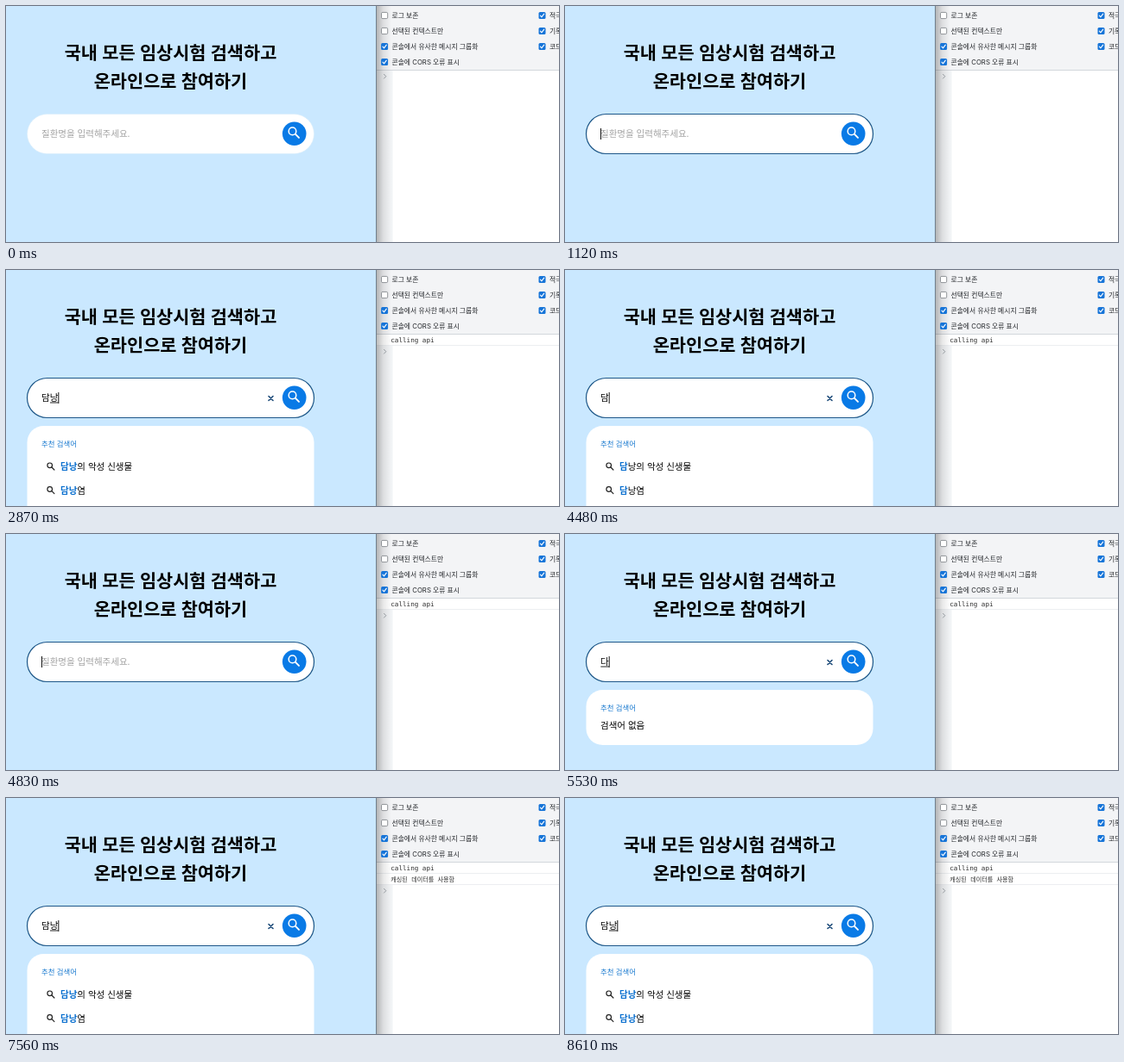
Animation, 640 px wide and 274 px high, one loop 8680 ms. Source, as an HTML page:

```html
<!DOCTYPE html>
<html lang="ko">
<head>
<meta charset="utf-8">
<title>검색어 추천</title>
<style>
  html, body { margin: 0; width: 100%; height: 100%; overflow: hidden; background: #cae8ff; }
  svg { display: block; width: 640px; height: 274px; }
  text { font-family: "Noto Sans CJK KR", "Noto Sans CJK", sans-serif; font-size: 10.5px; fill: #000; white-space: pre; }
  .title { font-size: 20.8px; font-weight: 700; word-spacing: -.5px; text-anchor: middle; }
  .hint { fill: #a3a3a3; }
  .label { font-size: 8.4px; fill: #1678cf; }
  .item { font-weight: 500; }
  .hit { fill: #0b70cf; font-weight: 700; }
  .option { font-family: Inter, "Noto Sans CJK KR", "Noto Sans CJK", sans-serif; font-size: 7.8px; fill: #24272b; }
  .log { font: 7.6px "DejaVu Sans Mono", "Noto Sans CJK KR", "Noto Sans CJK", monospace; fill: #303030; }
  .korean { font-size: 7.1px; }
  .line { fill: none; stroke-linecap: round; stroke-linejoin: round; }
</style>
</head>
<body>
<svg viewBox="0 0 640 274">
  <defs>
    <linearGradient id="shade">
      <stop offset="0" stop-opacity=".26"/>
      <stop offset=".45" stop-opacity=".09"/>
      <stop offset="1" stop-opacity="0"/>
    </linearGradient>
  </defs>
  <rect width="640" height="274" fill="#cae8ff"/>
  <text class="title" x="190.5" y="61.5">국내 모든 임상시험 검색하고</text>
  <text class="title" x="190.5" y="95">온라인으로 참여하기</text>

  <rect id="field" x="24.5" y="125.5" width="332" height="46" rx="23" fill="#fff"/>
  <text id="query" x="41" y="152"></text>
  <rect id="underline" y="153.5" height="1" fill="#222"/>
  <rect id="caret" y="142" width="1" height="13" fill="#111"/>
  <path id="clear" class="line" d="M304 146.500l5 5m0-5l-5 5" stroke="#1d4b79" stroke-width="1.6"/>
  <circle cx="333.700" cy="148.300" r="13.800" fill="#097ae6"/>
  <g class="line" stroke="#fff">
    <circle cx="331.500" cy="145.400" r="4.300" stroke-width="1.500"/>
    <path d="M334.800 148.700l4.200 4.200" stroke-width="1.900"/>
  </g>

  <g id="panel">
    <rect id="sheet" x="24.500" y="181" width="332" height="64" rx="19" fill="#fff"/>
    <text class="label" x="41" y="205">추천 검색어</text>
    <text id="none" class="item" x="41" y="226.200">검색어 없음</text>
    <g id="list"></g>
  </g>

  <rect x="429" width="211" height="274" fill="#fff"/>
  <rect x="429" width="211" height="74" fill="#f3f4f6"/>
  <rect x="429" y="74" width="18.500" height="200" fill="#f2f4f6"/>
  <rect x="429" y="74" width="211" height="1" fill="#d3d7dc"/>
  <g id="log1">
    <rect x="429" y="75" width="211" height="12.500" fill="#fff"/>
    <rect x="429" y="87" width="211" height="1" fill="#eceef1"/>
    <text class="log" x="445.300" y="84.400">calling api</text>
  </g>
  <g id="log2">
    <rect x="429" y="88" width="211" height="12.500" fill="#fff"/>
    <rect x="429" y="100" width="211" height="1" fill="#eceef1"/>
    <text class="log korean" x="445.300" y="97">캐싱된 데이터를 사용함</text>
  </g>
  <rect x="429" width="17" height="274" fill="url(#shade)"/>
  <rect x="428" width="1" height="274" fill="#71818d"/>
  <g id="options"></g>
  <path id="prompt" class="line" d="M437.500 79.300l2.300 2.400l-2.300 2.400" stroke="#8b9096" stroke-width=".9"/>
</svg>
<script>
const $ = id => document.getElementById(id);
const LOOP = 8680, BLINK = 500, LEFT = 41, GLYPH = 10.5 * 0.92;
const results = ['담낭의 악성 신생물', '담낭염'];

// start, query, is the last syllable being composed, panel
const steps = [
  [0, '', false, 'closed'],
  [1120, '', false, 'closed'],
  [1610, 'ㄷ', true, 'none'],
  [2030, '다', true, 'none'],
  [2100, '담', true, 'none'],
  [2450, '담나', true, 'none'],
  [2520, '담낭', true, 'none'],
  [4060, '담나', true, 'list'],
  [4200, '담ㄴ', true, 'list'],
  [4340, '담', false, 'list'],
  [4550, '', false, 'closed'],
  [5530, '다', true, 'none'],
  [5810, '담', true, 'none'],
  [6020, '담나', true, 'none'],
  [6160, '담낭', true, 'none']
];
const FOCUS = 1120, FETCHED = 2870, EMPTIED = 4550, CACHED = 6300;

function option(x, y, label, checked) {
  const box = checked
    ? `<rect x="${x}" y="${y - 4}" width="8" height="8" rx="1.5" fill="#1674d8"/>
       <path class="line" d="M${x + 1.9} ${y + .2}l1.5 1.7l2.8-3.7" stroke="#fff" stroke-width="1.1"/>`
    : `<rect x="${x + .4}" y="${y - 3.6}" width="7.2" height="7.2" rx="1.4" fill="#fff" stroke="#777b80" stroke-width=".8"/>`;
  return `${box}<text class="option" x="${x + 12.4}" y="${y + 2.7}">${label}</text>`;
}

$('options').innerHTML = [
  [434.1, 11, '로그 보존', false],
  [434.1, 29, '선택된 컨텍스트만', false],
  [434.1, 47, '콘솔에서 유사한 메시지 그룹화', true],
  [434.1, 65, '콘솔에 CORS 오류 표시', true],
  [616.5, 11, '적극', true],
  [616.5, 29, '기록', true],
  [616.5, 47, '코드', true]
].map(o => option(...o)).join('');

function resultRow(name, i, query) {
  const y = 228 + i * 27.7;
  const cut = name.startsWith(query) ? query.length : 0;
  return `<g class="line" stroke="#222" stroke-width="1.2">
      <circle cx="50.7" cy="${y - 1.2}" r="2.8"/><path d="M52.9 ${y + 1}l3 3"/></g>
    <text class="item" x="63" y="${y + 4}"><tspan class="hit">${name.slice(0, cut)}</tspan>${name.slice(cut)}</text>`;
}

const show = (id, on) => $(id).setAttribute('visibility', on ? 'visible' : 'hidden');
const set = (id, attrs) => { for (const k in attrs) $(id).setAttribute(k, attrs[k]); };
let listed = null;

function draw(t) {
  const [start, query, composing, mode] = steps.findLast(s => s[0] <= t);
  const focused = t >= FOCUS;
  const fetched = t >= FETCHED && t < EMPTIED || t >= CACHED;
  const panel = fetched ? 'list' : mode;
  const end = LEFT + query.length * GLYPH;

  set('field', focused
    ? { stroke: '#1d5788', 'stroke-width': 1.2 }
    : { stroke: '#d9edfa', 'stroke-width': .6 });
  $('query').textContent = query || '질환명을 입력해주세요.';
  set('query', { class: query ? '' : 'hint' });
  set('underline', { x: end - GLYPH + .3, width: GLYPH });
  show('underline', composing);

  // The emptied field keeps the blink phase of the held key.
  const since = t - (start === EMPTIED ? 4470 : start);
  set('caret', { x: end });
  show('caret', focused && Math.floor(since / BLINK) % 2 === 0);
  show('clear', query);

  $('panel').style.display = panel === 'closed' ? 'none' : '';
  $('none').style.display = panel === 'none' ? '' : 'none';
  $('list').style.display = panel === 'list' ? '' : 'none';
  set('sheet', { height: panel === 'list' ? 130 : 64 });
  if (panel === 'list' && listed !== query) {
    $('list').innerHTML = results.map((r, i) => resultRow(r, i, query)).join('');
    listed = query;
  }

  const logs = (t >= FETCHED) + (t >= CACHED);
  show('log1', logs > 0);
  show('log2', logs > 1);
  set('prompt', { transform: `translate(0 ${logs * 13})` });
}

const origin = performance.now();
function tick() {
  draw((performance.now() - origin) % LOOP);
  requestAnimationFrame(tick);
}
tick();
</script>
</body>
</html>
```
